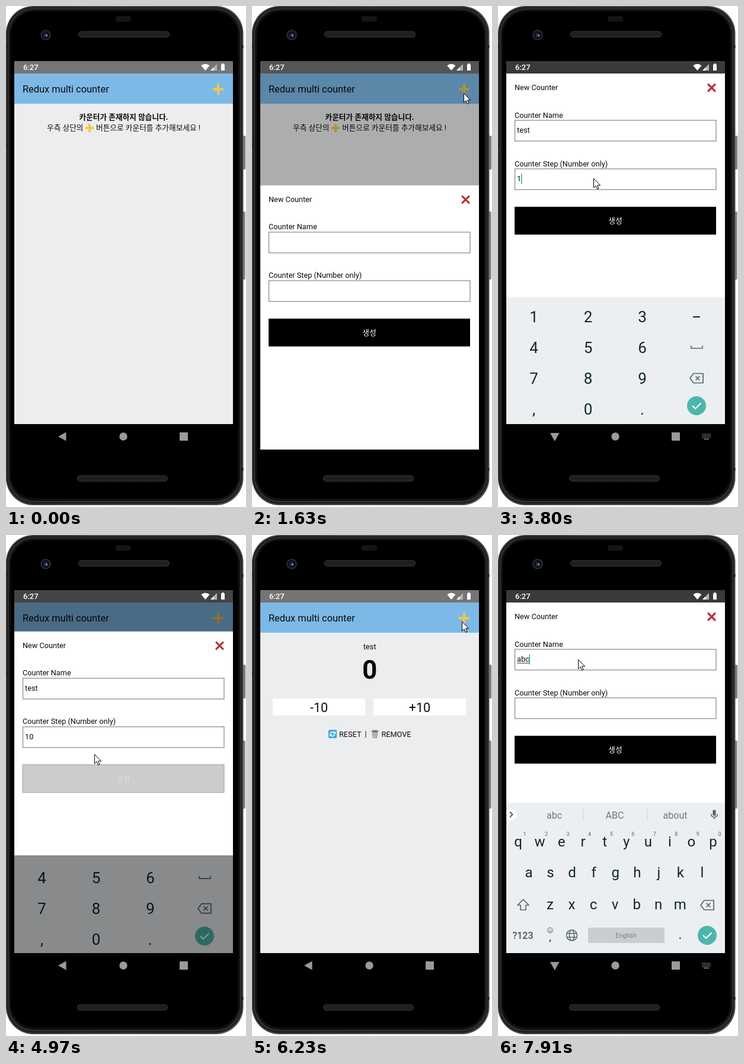
These frames come from a looping animation (405 px wide and 846 px high, 8 s). An HTML page:

```html
<!DOCTYPE html>
<html lang="ko">
<head>
<meta charset="utf-8">
<title>Multi counter</title>
<style>
html, body { margin: 0; width: 100%; height: 100%; overflow: hidden; background: #fff; }
svg { display: block; width: 405px; height: 846px; }
text { font-family: Roboto, 'Noto Sans CJK KR', 'Noto Sans CJK SC', sans-serif; font-size: 12.7px; white-space: pre; }
</style>
</head>
<body>
<svg id="stage" viewBox="0 0 405 846" xmlns="http://www.w3.org/2000/svg"></svg>
<script>
const LOOP = 8000;
const INK = '#10262b', ICON = '#56656b', TEAL = '#4db6ac';

// Markup helpers
const text = (x, y, s, o = {}) => `<text x="${x}" y="${y}" font-size="${o.size || 12.7}"
  style="font-size:${o.size || 12.7}px" font-weight="${o.weight || 400}" fill="${o.fill || '#0b0b0b'}"
  text-anchor="${o.left ? 'start' : 'middle'}" ${o.id ? `id="${o.id}"` : ''}>${s}</text>`;
const rect = (x, y, w, h, fill, more = '') =>
  `<rect x="${x}" y="${y}" width="${w}" height="${h}" fill="${fill}" ${more}/>`;
const circle = (x, y, r, fill, more = '') => `<circle cx="${x}" cy="${y}" r="${r}" fill="${fill}" ${more}/>`;
const line = (d, color, w = 1.5, more = '') =>
  `<path d="${d}" fill="none" stroke="${color}" stroke-width="${w}" ${more}/>`;
const shape = (d, fill, more = '') => `<path d="${d}" fill="${fill}" ${more}/>`;
const group = (id, body, more = '') => `<g id="${id}" ${more}>${body}</g>`;
const plus = (x, y, r, w) =>
  line(`M${x - r} ${y}H${x + r}M${x} ${y - r}V${y + r}`, '#f3c84b', w);

const defs = `<defs>
  <clipPath id="glass"><rect x="14" y="93" width="369" height="656"/></clipPath>
  <clipPath id="view"><rect x="14" y="93" width="369" height="613.5"/></clipPath>
  <pattern id="mesh" width="3" height="3" patternUnits="userSpaceOnUse">
    <rect width="3" height="3" fill="#2c2c2c"/><rect width="1.4" height="1.4" fill="#0c0c0c"/>
    <rect x="1.5" y="1.5" width="1.4" height="1.4" fill="#0c0c0c"/></pattern>
  <linearGradient id="rim" x2="1" y2="0"><stop offset="0" stop-color="#3c3c3c"/>
    <stop offset=".5" stop-color="#555"/><stop offset="1" stop-color="#4a4a4a"/></linearGradient>
  <linearGradient id="key" x2="1" y2="0"><stop offset="0" stop-color="#3a3a3a"/>
    <stop offset=".6" stop-color="#a09c99"/><stop offset="1" stop-color="#4e4c4a"/></linearGradient>
</defs>`;

function phone() {
  const grille = (x, y, w) => rect(x, y, w, 9.5, 'url(#mesh)', 'rx="4.5" stroke="#383838" stroke-width="1"');
  return rect(399, 219, 5, 57, 'url(#key)', 'rx="1.5"') + rect(399, 347, 4.5, 115, 'url(#key)', 'rx="1.5"') +
    rect(0, 0, 400.5, 843, 'url(#rim)', 'rx="46"') +
    rect(1.5, 1.8, 397, 839, '#1d1d1d', 'rx="45"') +
    rect(3.5, 4.5, 393, 833.5, '#343434', 'rx="43"') +
    rect(5, 6, 390, 830, '#111', 'rx="42"') +
    rect(8, 9, 384, 823, '#000', 'rx="40"') +
    [[0, 66], [0, 232], [398, 66], [398, 780]].map(([x, y]) => rect(x, y, 2.5, 5, '#222')).join('') +
    rect(185, 17, 26, 9.5, '#151515', 'rx="4"') +
    circle(67, 49, 9, '#26282b') + circle(67, 49, 6.5, '#0b0e14') +
    circle(67, 49, 3.6, '#1d3049') + circle(68.5, 50, 1.4, '#8ba2bd') +
    grille(122.5, 43, 153) + grille(120.5, 793, 152);
}

function page() {
  return rect(14, 93, 369, 613, '#ebedef') + rect(14, 93, 369, 21, '#757575') +
    rect(14, 114, 369, 51, '#7db9e7') +
    text(28, 146, 'Redux multi counter', { size: 16.4, left: 1 }) +
    group('add', plus(358, 140.5, 9.2, 3.8)) +
    group('empty',
      text(198.5, 192, '카운터가 존재하지 않습니다.', { weight: 700 }) +
      text(69, 210, '우측 상단의', { left: 1 }) + plus(141, 206, 7, 4) +
      text(152, 210, '버튼으로 카운터를 추가해보세요 !', { left: 1 })) +
    group('counter',
      text(198.5, 193, 'test') + text(198.5, 243, '0', { size: 44, weight: 700 }) +
      rect(35, 276, 156, 29, '#fff') + rect(205, 276, 156, 29, '#fff') +
      text(113, 299, '-10', { size: 21.5 }) + text(283, 299, '+10', { size: 21.5 }) +
      resetIcon() + text(147, 341, 'RESET', { left: 1 }) + text(192, 340, '|') +
      binIcon() + text(218.5, 341, 'REMOVE', { left: 1 }));
}

const resetIcon = () => rect(129, 329, 14, 14, '#3ba7dc', 'rx="1.5"') +
  line('M132 334.5Q136 330.5 139.5 334M140 337.5Q136 341.5 132.5 338', '#fff', 1.6) +
  shape('M141 331.5V336H136.5ZM131 340.5V336H135.5Z', '#fff');

const binIcon = () => shape('M202.5 332H212.5L211.3 343H203.7Z', '#9a9a98') +
  line('M205 334L205.6 342M207.5 334V342M210 334L209.4 342', '#d8d8d6', .9) +
  `<ellipse cx="207.5" cy="331.5" rx="6" ry="2" fill="#6d6d6b" stroke="#b9b9b7" stroke-width=".8"/>`;

function statusIcons() {
  return text(29, 108, '6:27', { size: 13, weight: 500, fill: '#fff', left: 1 }) +
    shape('M329.3 100.6Q336.4 95 343.5 100.6L336.4 109Z', '#fff') +
    shape('M356 98V109H345Z', '#b4b4b4') + shape('M350.5 103.5V109H345Z', '#fff') +
    shape('M363 98.5H364.7V97H367.3V98.5H369V109H363Z', '#fff');
}

const backspace = (x, y) =>
  line(`M${x - 11} ${y}L${x - 5} ${y - 8}H${x + 11}V${y + 8}H${x - 5}Z`, ICON, 1.7, 'stroke-linejoin="round"') +
  line(`M${x - 1.5} ${y - 3.5}l7 7m0 -7l-7 7`, ICON, 1.7);
const check = (x, y) => circle(x, y, 16, TEAL) + line(`M${x - 7} ${y}l5 5l9.5 -9.5`, '#fff', 2);

function letters() {
  const row = (keys, x0, y) => [...keys].map((k, i) =>
    text(x0 + i * 36.55, y, k, { size: 24, fill: INK })).join('');
  const digits = [...'1234567890'].map((d, i) =>
    text(45 + i * 36.55, 508, d, { size: 9, fill: ICON })).join('');
  return rect(14, 452, 369, 255, '#ebeff2') +
    circle(22, 472, 10, '#fff') + line('M20 467.5l4.5 4.5l-4.5 4.5', '#333', 1.7) +
    rect(143, 461, 1, 22, '#cdd3d6') + rect(251, 461, 1, 22, '#cdd3d6') +
    [95, 197, 299].map((x, i) => text(x, 478.5, '', { size: 16, fill: '#6c777c', id: 'hint' + i })).join('') +
    rect(362.4, 464, 5.2, 10, ICON, 'rx="2.6"') + line('M359.5 471Q360 476.5 365 476.5T370.5 471M365 476V480', ICON) +
    row('qwertyuiop', 34, 526) + digits + row('asdfghjkl', 52, 578) + row('zxcvbnm', 88, 631.5) +
    line('M42.5 615.5L52 625H47V633H38V625H33Z', ICON, 1.7, 'stroke-linejoin="round"') + backspace(353, 625) +
    text(42, 681.5, '?123', { size: 16, fill: '#42535a', weight: 500 }) +
    circle(88, 667.5, 4.4, 'none', `stroke="${ICON}"`) + circle(86.5, 666.5, .7, ICON) + circle(89.5, 666.5, .7, ICON) +
    line('M85.6 669Q88 671 90.4 669', ICON, 1) + text(88, 685, ',', { size: 18, fill: INK }) +
    circle(124.5, 676, 9, 'none', `stroke="${ICON}" stroke-width="1.5"`) +
    `<ellipse cx="124.5" cy="676" rx="4" ry="9" fill="none" stroke="${ICON}" stroke-width="1.4"/>` +
    line('M116.5 672.8H132.5M116.5 679.2H132.5', ICON, 1.4) +
    rect(152, 663, 129, 26, '#c9ced1', 'rx="2.5"') + text(216, 680, 'English', { size: 11, fill: '#778187' }) +
    text(307.5, 682, '.', { size: 22, fill: INK }) + check(353, 676);
}

function numbers() {
  const cols = [60.5, 152, 243.5];
  const keys = [...'123456789,0.'].map((k, i) =>
    text(cols[i % 3], 534 + Math.floor(i / 3) * 52, k, { size: 26, fill: INK })).join('');
  return rect(14, 491.5, 369, 215, '#ebeff2') + keys +
    rect(329, 524, 12, 2, INK) + line('M326 573.5V578H345V573.5', ICON, 1.7) +
    backspace(335, 628.5) + check(335, 675);
}

function navBar() {
  const c = '#9a9a9a';
  let dots = '';
  for (let i = 0; i < 18; i++) dots += rect(344.5 + i % 6 * 2.5, 722.5 + Math.floor(i / 6) * 2.6, 1.5, 1.5, '#7f8c96');
  return rect(14, 706, 369, 43, '#000') +
    shape('M88 727L101.5 719.5V734.5Z', c, 'id="back"') + shape('M88 721H103.5L95.7 735Z', c, 'id="down"') +
    circle(198, 727, 6.7, c) + rect(293, 720, 14, 14, c, 'rx="1"') +
    group('kbIcon', dots + rect(347, 730.5, 9, 1.5, '#7f8c96'));
}

function sheet() {
  const field = y => rect(28.5, y, 339.5, 35, '#fff', 'stroke="#858585" stroke-width="1.2"');
  return rect(14, 114, 369, 592, '#fff', 'id="paper"') +
    text(28, 142, 'New Counter', { left: 1 }) +
    line('M355 132.5L366 143.5M366 132.5L355 143.5', '#b43437', 3.2, 'stroke-linecap="round"') +
    text(28, 188.5, 'Counter Name', { left: 1 }) + field(193) +
    text(28, 270.5, 'Counter Step (Number only)', { left: 1 }) + field(275) +
    text(32, 214, '', { left: 1, id: 'name' }) + text(32, 296, '', { left: 1, id: 'step' }) +
    rect(32, 215.8, 0, 1, '#333', 'id="under"') + rect(32, 202, 1.5, 17, '#26a69a', 'id="caret"') +
    rect(28, 339, 340, 47, '#000', 'id="make"') +
    text(198, 367, '생성', { fill: '#fff', id: 'makeText' });
}

document.getElementById('stage').innerHTML = defs + phone() +
  group('screen',
    page() + group('kbClip', group('kb', group('abc', letters()) + group('num', numbers())), 'clip-path="url(#view)"') +
    rect(14, 93, 369, 613.5, '#000', 'id="dim"') + navBar() + group('sheet', sheet()) + statusIcons(),
    'clip-path="url(#glass)"') +
  shape('M.5 .5V16L4.1 12.7L6.6 18.4L9 17.4L6.6 11.8H11.6Z', '#fff',
    'id="mouse" stroke="#000" stroke-width="1" stroke-linejoin="round"');

const el = {};
document.querySelectorAll('[id]').forEach(n => el[n.id] = n);
const set = (id, a) => { for (const k in a) el[id].setAttribute(k, a[k]); };
const show = (id, on) => set(id, { display: on ? 'inline' : 'none' });
const say = (id, s) => { if (el[id].textContent !== s) el[id].textContent = s; };

// Timing helpers
const part = (t, from, span) => Math.min(1, Math.max(0, (t - from) / span));
const smooth = p => p * p * (3 - 2 * p);
const easeOut = p => 1 - (1 - p) * (1 - p);
const dip = (t, from, span) => 1 - .7 * Math.sin(Math.PI * part(t, from, span));
const typed = (t, word, times) => word.slice(0, times.filter(k => t >= k).length);

const mousePath = [
  [170, 323, 808], [950, 366, 147], [1020, 366, 147], [1240, 357, 147], [1680, 357, 147],
  [2220, 158, 204], [2880, 158, 204], [3080, 161, 291], [3989, 161, 291], [3990, 160, 291],
  [4380, 160, 291], [4740, 149, 370], [5540, 149, 370], [6230, 354, 146], [6330, 354, 138],
  [6400, 354, 138], [6420, 355, 138], [6700, 355, 138], [6980, 159, 177], [7220, 135, 210]
];
function mouseAt(t) {
  let i = mousePath.findIndex(k => k[0] > t);
  if (i < 0) i = mousePath.length;
  const a = mousePath[Math.max(0, i - 1)], b = mousePath[Math.min(i, mousePath.length - 1)];
  const p = a === b ? 0 : smooth(part(t, a[0], b[0] - a[0]));
  return [a[1] + (b[1] - a[1]) * p, a[2] + (b[2] - a[2]) * p];
}

const hints = {
  t: ['t', 'the', 'to'], te: ['te', 'tell', 'text'], tes: ['tes', 'test', 'yes'], test: ['test', 'tests', 'testing'],
  a: ['a', 'A', 'and'], ab: ['ab', 'AB', 'about'], abc: ['abc', 'ABC', 'about']
};

function draw(t) {
  const second = t >= 6000;
  const start = second ? 6630 : 1490;
  const closing = t >= 4905 && !second;
  const open = t >= start && !(closing && t >= 5135);

  // Sheet position and backdrop
  const fall = part(t, 4905, 230);
  const shift = closing ? 612 * fall * fall : 612 * (1 - easeOut(part(t, start, 315)));
  const shade = closing ? .5 * (1 - fall ** 1.5) : .5 * part(t, start, 260);

  // Keyboard
  const kbStart = second ? 7390 : 2390;
  const kbOn = t >= kbStart && (second || t < 5130);
  const numeric = !second && t >= 3310;
  const kbTop = numeric ? 491.5 : 452;
  const kbDrop = closing ? 215 * part(t, 4952, 178) ** 2 : (706 - kbTop) * (1 - easeOut(part(t, kbStart, 200)));
  show('kb', kbOn);
  show('abc', !numeric);
  show('num', numeric);
  set('kb', { transform: `translate(0 ${kbDrop})` });
  const kbUp = kbOn && !closing;
  show('back', !kbUp);
  show('down', kbUp);
  show('kbIcon', kbUp);

  show('sheet', open);
  set('sheet', { transform: `translate(0 ${shift})` });
  set('paper', { height: closing ? 378 : kbOn ? kbTop + kbDrop - 114 : 592 });
  set('dim', { opacity: open ? shade : 0, height: kbUp ? 300 : 613.5 });

  // Page
  const made = t >= 4905;
  show('empty', !made);
  show('counter', made);
  set('add', { opacity: t < 3000 ? dip(t, 1060, 180) : dip(t, 6395, 45) });

  // Form
  const name = second ? typed(t, 'abc', [7680, 7790, 7900]) : typed(t, 'test', [2620, 2710, 2790, 2870]);
  const step = second ? '' : typed(t, '10', [3800, 4240]);
  const onStep = !second && t >= 3250;
  say('name', name);
  say('step', step);
  const width = id => el[id].textContent ? el[id].getComputedTextLength() : 0;
  set('caret', { x: 32 + width(onStep ? 'step' : 'name') - .2, y: onStep ? 283 : 201.5 });
  show('caret', kbUp);
  set('under', { width: onStep ? 0 : width('name') });
  const hint = hints[name] || ['', '', ''];
  hint.forEach((h, i) => say('hint' + i, h));

  const press = second ? 0 : part(t, 4780, 110);
  const grey = Math.round(204 * press);
  set('make', { fill: `rgb(${grey},${grey},${grey})`, stroke: press ? '#a0a0a0' : 'none' });
  set('makeText', { 'fill-opacity': 1 - .6 * press });

  const [x, y] = mouseAt(t);
  set('mouse', { transform: `translate(${Math.round(x)} ${Math.round(y)})` });
  show('mouse', t >= 170);
}

let begin = null;
function tick(now) {
  if (begin === null) begin = now;
  draw((now - begin) % LOOP);
  requestAnimationFrame(tick);
}
draw(0);
requestAnimationFrame(tick);
</script>
</body>
</html>
```
